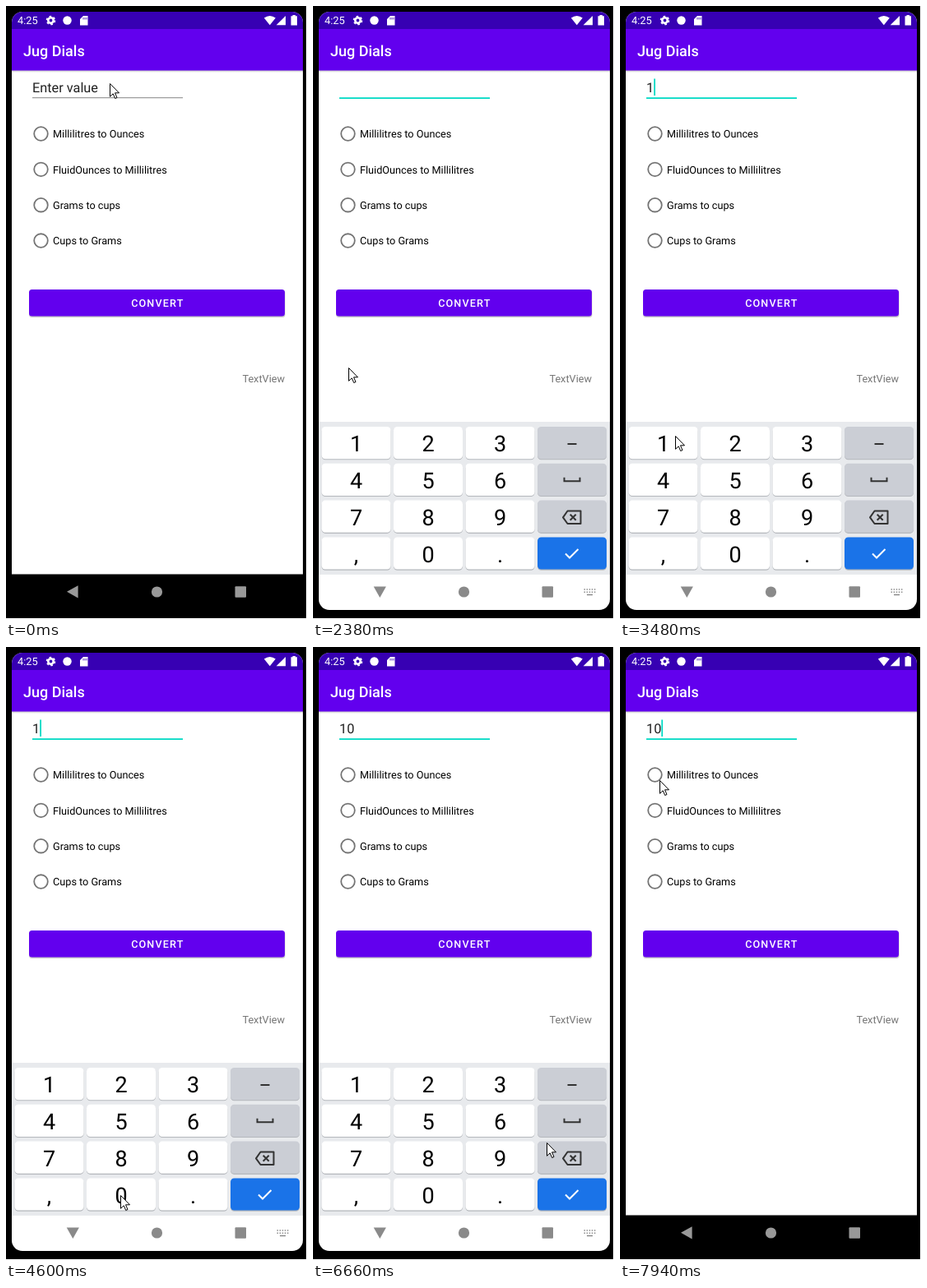
Recreate the animation shown at these times as an HTML page. Size 366 by 746 pixels, loop 8 s.

```html
<!DOCTYPE html>
<html lang="en">
<head>
<meta charset="utf-8">
<title>Unit converter</title>
<style>
  html, body { margin: 0; width: 100%; height: 100%; overflow: hidden; background: #fff; }
  svg {
    display: block; width: 366px; height: 746px;
    font-family: Roboto, sans-serif; text-rendering: geometricPrecision;
  }
  .medium { font-weight: 500; }
</style>
</head>
<body>
<svg viewBox="0 0 366 746">
  <defs>
    <clipPath id="screen"><rect x="7" y="7" width="354" height="728" rx="13"/></clipPath>
    <linearGradient id="shade" x2="0" y2="1">
      <stop stop-color="#000" stop-opacity=".25"/><stop offset="1" stop-color="#000" stop-opacity="0"/>
    </linearGradient>
  </defs>
  <rect width="365" height="745"/>
  <g clip-path="url(#screen)">
    <rect x="7" y="7" width="354" height="684.5" fill="#fff"/>
    <rect x="7" y="78" width="354" height="3" fill="url(#shade)"/>
    <rect x="7" y="28" width="354" height="50.5" fill="#6200ee"/>
    <rect x="7" y="7" width="354" height="21" fill="#3700b3"/>

    <g fill="#fff">
      <text x="14" y="22.3" font-size="12.8">4:25</text>
      <g fill="none" stroke="#fff">
        <circle cx="54.5" cy="17.5" r="3.2" stroke-width="2.6"/>
        <circle cx="54.5" cy="17.5" r="4.9" stroke-width="1.8" stroke-dasharray="2.57"/>
      </g>
      <circle cx="74.5" cy="17.5" r="5.2"/>
      <path d="M94 12h5.5v11.5h-9.5v-7.5z"/>
      <path d="M94 14v2.5M96 14v2.5M98 14v2.5" stroke="#3700b3" stroke-width=".8"/>
      <path d="M313.8 14.6q7-5.2 14 0L320.8 23.3z"/>
      <path d="M340 12v11.3h-11.3z"/>
      <path d="M348.5 11h3.5v1.3h2v11.3h-7.5v-11.3h2z"/>
      <text x="21" y="61" font-size="18" class="medium">Jug Dials</text>
    </g>

    <text id="entry" x="32" y="105.2" font-size="16.3" fill="#212121"></text>
    <rect id="underline" x="32" y="111.2" width="183"/>
    <rect id="caret" y="88.5" width="1.8" height="20.5" fill="#03dac5"/>
    <path id="handle" d="M113.5 110l6.4 6.3a9 9 0 1 1-12.8 0z" fill="#03dac5"/>

    <g id="options" font-size="12.7"></g>
    <rect x="28" y="346" width="311.5" height="33" rx="3.5" opacity=".2"/>
    <rect x="28" y="345" width="311" height="32.5" rx="3.5" fill="#6200ee"/>
    <text x="184.3" y="366.2" font-size="12.6" letter-spacing="1.13" text-anchor="middle" fill="#fff" class="medium">CONVERT</text>
    <text x="339" y="458" font-size="12.7" text-anchor="end" fill="#757575">TextView</text>

    <g id="keyboard">
      <rect x="7" y="506" width="354" height="187" fill="#e8eaed"/>
      <rect x="7" y="692" width="354" height="44" fill="#fff"/>
      <g id="keys" font-size="27" text-anchor="middle"></g>
      <g fill="none" stroke="#333" stroke-width="2">
        <path d="M309.5 533h11M305.5 573.8v4.4h19v-4.4"/>
        <path d="M309.5 614.5h16v15.5h-16l-5.5-7.7z" stroke-linejoin="round"/>
        <path d="M312.7 618.7l7 7m0-7l-7 7"/>
        <path d="M307 666.5l5 5 10.5-10.5" stroke="#fff"/>
      </g>
      <g stroke="#8a8a8a" stroke-width="1.5">
        <path d="M329.5 710h14M329.5 713.2h14" stroke-dasharray="1.5 1.6"/>
        <path d="M333 716.5h7"/>
      </g>
    </g>
    <g id="nav">
      <path id="back" d="M-7.3 0L6.3-7.6v15.2z"/>
      <circle cx="183.5" cy="713" r="6.6"/>
      <rect x="278.5" y="706.3" width="13.5" height="13.5" rx="1"/>
    </g>
  </g>
  <path id="pointer" d="M.5.5V16.3L4.2 12.8 6.7 18.5 9 17.5 6.5 11.8H11.5z" fill="#fff" stroke="#000"/>
</svg>
<script>
const DURATION = 8000;
const REFRESH = 120;
const $ = id => document.getElementById(id);

// The picture refreshes in bursts (start, end) and holds still between them.
const bursts = [
  [0, 0], [250, 250], [530, 1350], [1600, 1960], [2380, 3080],
  [3360, 4170], [4450, 5430], [5810, 6780], [7060, 7450], [7820, 7940]
];

const pointerStart = { x: 126, y: 94 };
const pointerMoves = [
  { from: 2379, to: 2380, x: 43, y: 440 },
  { from: 2380, to: 3080, x: 67, y: 523 },
  { from: 3630, to: 4170, x: 139, y: 667 },
  { from: 4770, to: 5430, x: 192, y: 211 },
  { from: 5700, to: 6100, x: 49, y: 166 },
  { from: 6200, to: 6780, x: 318, y: 667 },
  { from: 7180, to: 7450, x: 50, y: 194 },
  { from: 7700, to: 7940, x: 48, y: 162 }
];

const focusAt = 250, handleAt = 530, eraseAt = 1600, erasedAt = 1870, typeOneAt = 3360, typeZeroAt = 4700;

const ramp = (t, from, to) => Math.min(1, Math.max(0, (t - from) / (to - from)));
const ease = p => p * p * (3 - 2 * p);

function heldTime(now) {
  const [start, end] = bursts.findLast(burst => burst[0] <= now);
  return now >= end ? end : start + Math.floor((now - start) / REFRESH) * REFRESH;
}

function pointerAt(t) {
  return pointerMoves.reduce(({ x, y }, move) => {
    const p = ease(ramp(t, move.from, move.to));
    return { x: x + (move.x - x) * p, y: y + (move.y - y) * p };
  }, pointerStart);
}

function entryText(t) {
  if (t >= typeZeroAt) return "10";
  if (t >= typeOneAt) return "1";
  const left = t < eraseAt ? 1 : 1 - ramp(t, 1500, 1960);
  return "Enter value".slice(0, Math.round(11 * left));
}

function caretOn(t) {
  const reset = [focusAt, erasedAt, typeOneAt, typeZeroAt].findLast(time => time <= t);
  return (t - reset) % 1000 < 500;
}

function build() {
  const labels = ["Millilitres to Ounces", "FluidOunces to Millilitres", "Grams to cups", "Cups to Grams"];
  $("options").innerHTML = labels.map((label, i) => {
    const y = 155.5 + i * 43.35;
    return `<circle cx="42.5" cy="${y}" r="8.3" fill="none" stroke="#757575" stroke-width="1.8"/>
      <text x="57" y="${y + 4.7}">${label}</text>`;
  }).join("");

  const rows = ["123 ", "456 ", "789 ", ",0. "];
  $("keys").innerHTML = rows.map((row, r) => [...row].map((char, c) => {
    const x = 10.5 + c * 87.5, y = 512 + r * 44.8;
    const fill = c < 3 ? "#fff" : r < 3 ? "#cbced5" : "#1a73e8";
    return `<rect x="${x}" y="${y + 1}" width="84" height="39.3" rx="4.5" fill="#b4b7bc"/>
      <rect x="${x}" y="${y}" width="84" height="39.2" rx="4.5" fill="${fill}"/>
      <text x="${x + 42}" y="${y + 30.3}">${char}</text>`;
  }).join("")).join("");
}

function set(id, attributes) {
  for (const [name, value] of Object.entries(attributes)) $(id).setAttribute(name, value);
}

function show(id, visible) {
  $(id).style.visibility = visible ? "visible" : "hidden";
}

function draw(now) {
  const t = heldTime(now);
  const focused = t >= focusAt;

  $("entry").textContent = entryText(t);
  set("underline", focused ? { height: 1.8, fill: "#03dac5" } : { height: 1, fill: "#858585" });
  set("caret", { x: 32 + $("entry").getComputedTextLength() });
  show("caret", focused && caretOn(t));
  show("handle", t >= handleAt && t < eraseAt);

  const shown = ramp(t, 450, 650) - ramp(t, 7060, 7376);
  set("keyboard", { opacity: shown, transform: `translate(0 ${(1 - shown) * 60})` });

  const gray = Math.round(153 - 15 * shown + 160 * shown * (1 - shown));
  const turn = ramp(t, 530, 930) - ramp(t, 7060, 7450);
  set("nav", { fill: `rgb(${gray},${gray},${gray})` });
  set("back", { transform: `translate(81.3 712.8) rotate(${-90 * turn})` });

  const { x, y } = pointerAt(t);
  set("pointer", { transform: `translate(${Math.round(x)} ${Math.round(y)})` });
}

function frame() {
  draw(performance.now() % DURATION);
  requestAnimationFrame(frame);
}

build();
frame();
</script>
</body>
</html>
```
